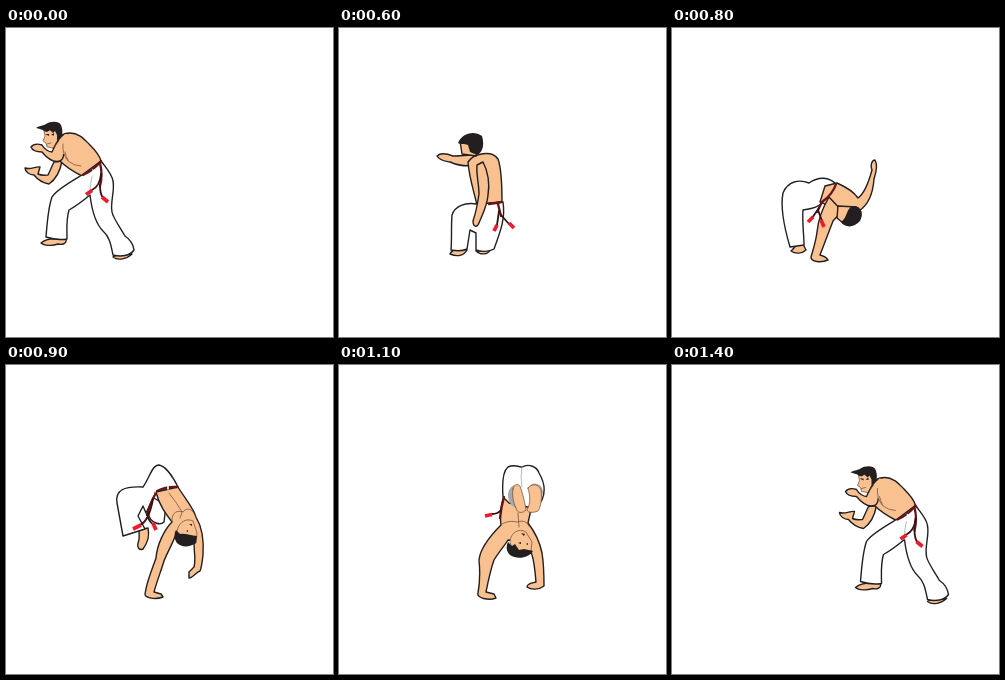
An HTML page without scripts for the animation above (1900 ms loop, 327 by 309 pixels).

```html
<!DOCTYPE html>
<html lang="en">
<head>
<meta charset="utf-8">
<title>Capoeira walkover</title>
<style>
  html, body { margin: 0; width: 100%; height: 100%; overflow: hidden; background: #fff; }
  svg { display: block; width: 100%; height: 100%; }
  path { stroke-linejoin: round; stroke-linecap: round; }
  .skin { fill: #f9c090; stroke: #231f20; stroke-width: 1.4; }
  .bare { fill: #f9c090; }
  .soft { fill: #f9c090; stroke: #6b4a38; stroke-width: .7; }
  .cloth { fill: #fff; stroke: #231f20; stroke-width: 1.4; }
  .shade { fill: #a9a9a9; }
  .hair { fill: #231f20; }
  .fine { fill: none; stroke: #6b4a38; stroke-width: .7; }
  .fold { fill: none; stroke: #999; stroke-width: .7; }
  .belt { fill: none; stroke: #651518; stroke-width: 2.3; }
  .cord { fill: none; stroke: #37100f; stroke-width: 1.8; }
  .loop { fill: none; stroke: #fff; stroke-width: 1.6; }
  .tip { fill: none; stroke: #ec1c2e; stroke-width: 3.8; stroke-linecap: butt !important; }

  /* --t: when the pose appears; the hold is set by the keyframes */
  .pose { visibility: hidden; animation: brief 1.9s step-end calc(var(--t) - 1.9s) infinite; }
  .long { animation-name: long; }
  .mid { animation-name: mid; }
  @keyframes brief { 0% { visibility: visible } 5.26316%, 100% { visibility: hidden } }
  @keyframes mid { 0% { visibility: visible } 10.52632%, 100% { visibility: hidden } }
  @keyframes long { 0% { visibility: visible } 26.31579%, 100% { visibility: hidden } }
</style>
</head>
<body>
<svg viewBox="0 0 327 309">
  <defs>
    <g id="guard">
      <path class="skin" d="M35 215C40 210 50 210 60 211C61 216 56 217 52 216C47 218 38 218 35 215Z"/>
      <path class="skin" d="M107 229C110 226 121 226 126 226C121 231 112 233 107 229Z"/>
      <path class="skin" d="M19 140C25 142 30 138 34 139L32 146C36 148 40 147 42 147C44 143 46 138 48 134L56 133C54 144 49 152 43 156C37 155 32 152 28 147C24 147 19 144 19 140Z"/>
      <path class="skin" d="M50 117C52 108 57 105 64 105C73 105 78 111 83 116C89 122 94 128 95 133L76 148C68 144 59 138 54 133Z"/>
      <path class="cloth" d="M76 147C66 153 50 162 46 169C42 180 41 197 40 209C46 211 55 212 61 211C61 200 60 192 63 182C70 178 78 172 84 167C86 184 90 196 97 203C104 209 105 218 107 227C115 229 124 228 128 222C127 215 122 210 119 208C114 199 107 190 106 184C104 174 109 163 107 153C106 146 101 141 95 133Z"/>
      <path class="fold" d="M84 167Q84 155 86 149"/>
      <path class="soft" d="M38 103L39 108L37 113L40 115L41 119L47 120L54 113L54 102Z"/>
      <path class="skin" d="M25 119C28 115 33 116 36 117C38 121 43 124 46 124C49 118 52 109 58 107L58 122C58 128 57 132 54 133C48 135 41 130 36 124C33 124 27 124 25 119Z"/>
      <path class="bare" d="M53 112L59 106L66 108L62 126L57 126Z"/>
      <path class="fine" d="M57 116Q56 126 62 133Q68 138 75 138M59 124Q60 129 62 132M41 116L45 115M47 120L53 113"/>
      <path class="hair" d="M30 100C34 97 38 98 40 96C45 93 53 93 55 97C57 102 57 108 54 111L51 113L51 107L49 103L47 105L44 102L41 104L38 103C36 101 33 101 30 100ZM39 106l4 0l0 2zM45 107l3-2l0 2.5z"/>
      <path class="belt" d="M77 147Q88 142 95 133"/>
      <path class="loop" d="M87 142l2 4"/>
      <path class="belt" d="M94 135Q97 147 94 158"/>
      <path class="cord" d="M95 146Q94 158 86 162M94 157Q94 166 97 170"/>
      <path class="tip" d="M86 162.500L80 166.500M96 169L102 174"/>
    </g>
  </defs>

  <use class="pose long" style="--t:0s" href="#guard"/>

  <g class="pose" style="--t:.5s">
    <path class="skin" d="M108 226C111 222 121 222 127 223C125 228 116 229 108 226ZM132 222L145 223C141 226 134 225 132 222Z"/>
    <path class="skin" d="M100 140C105 134 112 136 118 133C124 131 128 128 130 124L133 133C128 139 118 140 110 138C106 139 103 143 100 140Z"/>
    <path class="skin" d="M111 103L113 108L125 109L126 102Z"/>
    <path class="skin" d="M84 107C87 104 93 106 98 107C105 110 110 109 113 108C120 107 128 104 138 104C146 103 153 106 155 112C158 122 160 135 160 146L134 148C131 140 133 133 131 128C128 124 124 121 124 115C118 117 108 118 100 114C96 110 90 111 84 109Z"/>
    <path class="fine" d="M146 110Q152 126 152 141M124 115L126 109"/>
    <path class="hair" d="M107 104C111 90 122 86 131 90C135 96 133 102 130 104L120 107L118 102C114 101 112 105 107 104Z"/>
    <path class="cloth" d="M134 147C127 154 117 166 113 174C110 185 109 205 107 222C114 224 122 224 127 221C126 210 129 200 130 191L133 180C137 195 134 210 132 220C140 224 150 224 157 220C158 205 153 190 151 180C157 172 163 162 163 157C163 152 162 148 160 146Z"/>
    <path class="fold" d="M134 178Q146 174 151 166"/>
    <path class="belt" d="M134 147Q146 145 159 145"/>
    <path class="loop" d="M143 145v4M157 144v3"/>
    <path class="belt" d="M134 149Q131 162 133 172"/>
    <path class="cord" d="M133 158Q134 174 125 176M132 171Q133 179 136 181"/>
    <path class="tip" d="M125 176L119 180M135 181L141 187"/>
  </g>

  <g class="pose" style="--t:.6s">
    <path class="skin" d="M111 226C114 220 123 220 128 222C125 228 118 229 111 226ZM137 223L151 222C149 227 141 227 137 223Z"/>
    <path class="skin" d="M98 128C102 124 109 126 114 128C121 128 129 127 136 127L137 137C127 139 118 137 111 134C106 133 101 133 98 128Z"/>
    <path class="skin" d="M129 134C135 125 153 122 159 131C163 142 163 160 163 174L138 177C135 164 130 149 129 134Z"/>
    <path class="cloth" d="M138 176C126 174 116 178 113 187C112 199 113 211 112 222C117 223 124 223 128 221L131 202L137 205L137 222C142 224 150 224 155 221C159 209 167 193 164 174Z"/>
    <path class="skin" d="M144 134C149 143 151 156 149 167C148 179 143 187 140 195C138 200 134 199 134 193C136 187 138 180 140 166C140 156 137 146 138 137Z"/>
    <path class="skin" d="M121 113L123 126L137 128L140 113Z"/>
    <path class="hair" d="M119 115C123 105 135 102 143 108C146 118 143 125 138 127L131 124L129 117C125 115 122 117 119 115Z"/>
    <path class="belt" d="M150 176L163 174M159 176L162 188"/>
    <path class="cord" d="M160 183L158 197M162 187L170 196"/>
    <path class="tip" d="M158 197L155 203M170 195L175 200"/>
  </g>

  <g class="pose" style="--t:.7s">
    <path class="skin" d="M126 97L130 99C131 95 130 88 133 87C138 88 138 97 137 103C142 113 150 124 152 132L153 138L143 136C139 125 133 112 131 104C128 103 126 100 126 97Z"/>
    <path class="cloth" d="M118 222C114 205 111 190 112 179C114 171 126 170 133 180C137 185 140 190 141 197L157 207L165 205C165 200 165 193 163 190L155 188L145 223C152 223 158 221 157 208L138 203L134 217Z"/>
    <path class="skin" d="M117 225C122 222 123 217 130 216L132 225C128 227 120 227 117 225Z"/>
    <path class="skin" d="M137 154C133 163 136 172 141 178C140 195 140 210 138 222C136 229 141 234 152 234C156 232 152 228 146 225C149 214 152 207 155 199L162 198C163 181 164 165 162 149Z"/>
    <path class="fine" d="M141 178Q146 176 151 168M155 199Q157 188 154 178"/>
    <path class="skin" d="M139 139L134 149L136 154L143 156L152 151L148 137Z"/>
    <path class="hair" d="M138 140C142 133 156 132 161 138C164 146 160 153 156 156L150 152L147 155L144 151C146 145 143 142 138 140ZM138 146l3 0l0 1z"/>
    <path class="belt" d="M154 200Q160 200 163 195M153 200Q163 203 168 211"/>
    <path class="cord" d="M165 206Q172 213 170 223M166 209Q173 217 181 219"/>
    <path class="tip" d="M170 223L168 231M180 219L189 221"/>
  </g>

  <g class="pose" style="--t:.8s">
    <path class="skin" d="M119 223C123 220 124 215 130 214L134 222C130 226 123 226 119 223Z"/>
    <path class="cloth" d="M118 219C113 202 108 180 111 165C116 153 127 151 137 155C147 148 157 149 164 156L150 175C144 181 136 181 131 182C130 194 132 207 132 217Z"/>
    <path class="skin" d="M153 158L165 155C174 159 182 164 186 170C193 165 197 153 200 142C198 137 200 132 203 132C206 137 204 145 202 151C201 165 196 177 187 183L171 189C160 184 153 174 148 174Z"/>
    <path class="skin" d="M157 169C150 181 146 193 145 204C144 213 141 222 139 229C139 234 149 235 156 232C154 228 150 228 148 227C153 214 158 201 161 193L170 183Z"/>
    <path class="skin" d="M166 178L165 190L171 195L182 191L184 179Z"/>
    <path class="hair" d="M169 194C176 189 174 180 181 178C190 178 192 186 188 193C182 200 173 200 169 194Z"/>
    <path class="belt" d="M150 174Q161 166 164 156M150 174L145 184"/>
    <path class="cord" d="M147 180L140 190M146 182L150 193"/>
    <path class="tip" d="M141 189L136 194M149 192L152 199"/>
  </g>

  <g class="pose" style="--t:.9s">
    <path class="cloth" d="M146 132C139 140 141 155 150 158Q155 160 158 157L160 140Z"/>
    <path class="skin" d="M133 165L142 163C144 172 140 180 137 184C133 186 131 182 132 178C134 174 133 169 133 165Z"/>
    <path class="cloth" d="M117 171L111 138C109 125 118 121 137 122C144 112 146 100 153 100C160 101 168 114 172 122L150 127L140 148L137 141L132 151L139 164Z"/>
    <path class="skin" d="M150 127L172 122C178 132 188 144 190 152C196 162 198 175 197 190C196 199 195 204 194 206C190 207 187 213 183 213L183 207L188 202C190 195 188 187 188 178L170 169C167 178 161 188 158 196C155 206 151 216 148 227L155 229L157 232C149 235 139 233 139 229C141 215 146 205 150 193C151 180 158 165 166 157C160 149 153 140 150 127Z"/>
    <path class="fine" d="M166 157C165 147 172 145 177 147C182 141 188 145 190 153M163 128Q171 138 176 147L174 153"/>
    <path class="soft" d="M171 166C173 156 181 153 187 156L191 168L190 178L177 179Z"/>
    <path class="hair" d="M170 165L174 169C179 168 185 171 191 171L190 178C184 182 176 183 171 178C168 174 168 168 170 165ZM183 159l3 0l0 2zM180 166l2-1l0 2z"/>
    <path class="belt" d="M149 127Q160 121 171 122M150 128Q144 138 141 150"/>
    <path class="loop" d="M149 123v4M162 120v4"/>
    <path class="cord" d="M147 134Q143 156 134 160M141 149Q143 157 147 159"/>
    <path class="tip" d="M135 160L127 164M147 158L150 165"/>
  </g>

  <g class="pose" style="--t:1s">
    <path class="skin" d="M176 39C173 33 175 28 180 28C185 29 187 35 186 41Z"/>
    <path class="skin" d="M129 91C124 86 123 79 127 77L135 83L137 91Z"/>
    <path class="cloth" d="M163 133C156 127 149 113 147 103L130 93L137 81C147 85 157 91 163 97L168 108C172 86 172 59 174 40L188 39C193 61 195 85 194 108C194 119 192 127 189 134Z"/>
    <path class="fold" d="M168 108L174 121"/>
    <path class="skin" d="M163 133L189 133C188 142 188 151 188 158C196 167 201 178 203 188C205 200 205 212 205 221C200 225 192 225 188 222C188 218 194 218 197 217C196 205 195 196 193 190L188 178L169 176C164 183 158 189 154 195C152 203 150 212 147 227L155 229L157 233C150 236 137 233 139 228C141 217 141 205 140 195C141 185 150 172 162 160C160 151 161 142 163 133Z"/>
    <path class="fine" d="M163 160Q170 155 177 157Q185 153 189 160M177 138V156"/>
    <path class="soft" d="M171 176C172 167 180 163 187 167L192 177L191 186L174 186Z"/>
    <path class="hair" d="M169 177L173 181L177 179L181 185L194 186C189 193 178 195 171 190C167 186 167 181 169 177ZM183 169l3 0l0 2zM180 178l2-1l0 2z"/>
    <path class="belt" d="M163 133Q177 136 189 133M165 134L160 146"/>
    <path class="cord" d="M161 144L151 151M160 146L161 156"/>
    <path class="tip" d="M152 150L146 154M161 155L161 162"/>
  </g>

  <g class="pose" style="--t:1.1s">
    <path class="skin" d="M165 131C161 142 161 152 162 160C150 172 141 185 140 195C141 205 141 217 139 228C137 233 150 236 157 233L155 229L147 227C150 212 152 203 155 195C160 187 166 180 169 175L189 177L193 190C195 196 196 205 197 217C194 218 188 218 188 222C192 225 200 225 205 221C205 212 205 200 203 188C201 178 196 167 189 158L193 140Z"/>
    <path class="cloth" d="M164 132C163 118 164 106 169 102C175 99 180 102 183 102C190 98 198 102 200 108C206 118 206 128 203 135C200 140 196 143 193 143L170 138Z"/>
    <path class="shade" d="M169 131C169 123 174 119 179 120L178 144C172 141 169 136 169 131ZM189 123C192 116 203 117 204 127C203 134 200 138 197 141Z"/>
    <path class="soft" d="M174 124C175 118 181 118 182 124C184 130 186 138 187 145C183 149 178 148 177 143C174 137 173 130 174 124ZM189 123C193 118 200 119 202 125C203 133 202 142 199 146C194 148 189 148 188 145C192 138 191 130 189 123Z"/>
    <path class="fold" d="M183 102Q181 112 183 122"/>
    <path class="fine" d="M163 159Q170 155 178 157Q187 154 190 161M179 148L180 162"/>
    <path class="soft" d="M171 176C172 167 180 163 187 167L193 177L192 186L174 186Z"/>
    <path class="hair" d="M169 177L173 181L176 179L180 185L185 184L194 186C190 193 178 195 171 190C167 186 167 181 169 177ZM182 168l4 1l-1 2zM179 178l3-1l0 2zM187 179l2-1l0 2z"/>
    <path class="belt" d="M165 132Q162 143 161 153"/>
    <path class="cord" d="M162 145Q159 149 153 149"/>
    <path class="tip" d="M153 149.500L146 151"/>
  </g>

  <g class="pose mid" style="--t:1.2s">
    <path class="hair" d="M137 146C138 140 143 137 149 139L145 149Z"/>
    <path class="skin" d="M180 226L192 225C191 231 184 232 180 228ZM193 221L208 219C207 225 198 226 193 223Z"/>
    <path class="skin" d="M166 122C155 131 146 140 140 147C130 155 120 162 121 167C126 177 135 181 141 184C147 184 152 183 154 180C152 177 147 178 143 176C140 172 135 168 135 165C140 160 150 161 157 158C160 150 162 140 168 124Z"/>
    <path class="fine" d="M140 158Q149 151 156 155"/>
    <path class="cloth" d="M166 123C173 119 190 118 194 125C198 137 196 153 196 170C200 190 207 200 209 213C209 221 200 222 193 221C193 227 178 230 169 226C163 220 162 205 161 185C160 160 158 140 166 123Z"/>
    <path class="fold" d="M181 142Q181 162 183 180Q188 197 193 221"/>
    <path class="belt" d="M168 122Q177 118 187 122M167 124Q158 137 157 159"/>
    <path class="loop" d="M170 119l1 4M184 119v4"/>
    <path class="cord" d="M158 152Q154 161 147 160M157 158Q154 166 157 170"/>
    <path class="tip" d="M148 160L141 162M156 169L161 175"/>
  </g>

  <g class="pose long" style="--t:1.4s"><use href="#guard" x="148.500" y="7.500"/></g>
</svg>
</body>
</html>
```
